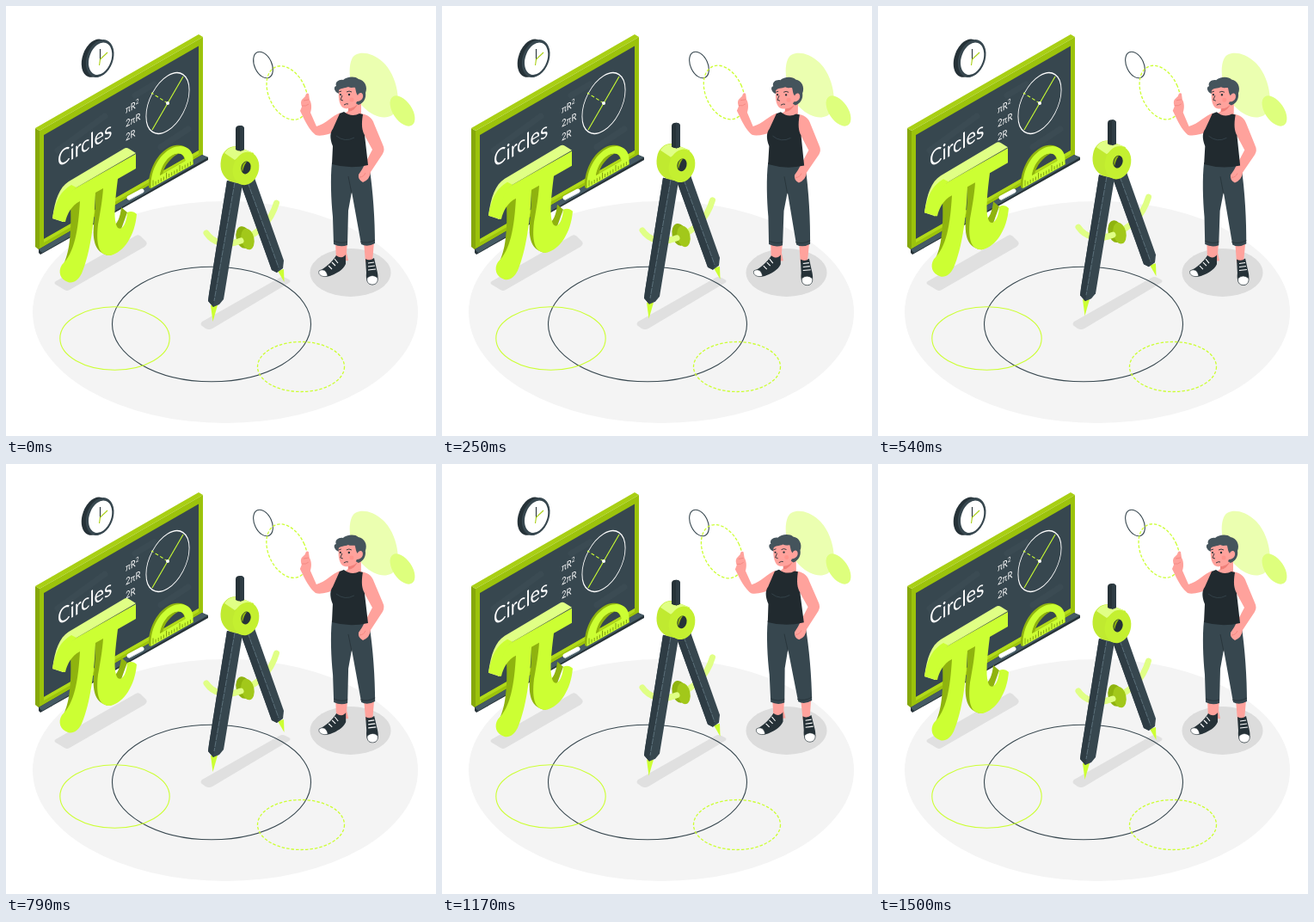
These frames come from a looping animation (500 px wide and 500 px high, 1540 ms). An HTML page:

```html
<!DOCTYPE html>
<html lang="en">
<head>
<meta charset="utf-8">
<title>Circles</title>
<style>
  html, body { margin: 0; height: 100%; overflow: hidden; background: #fff }
  svg { display: block; width: 100vw; height: 100vh }
  text { font-family: Lato, "Open Sans", sans-serif; fill: #fff }
  .line { fill: none; stroke-width: 1.1 }
  .rod { fill: none; stroke: #e0ff85; stroke-width: 7; stroke-linecap: round }
  .main { fill: #cf3 }
  .pale { fill: #e0ff85 }
  .olive { fill: #8fb30f }
  .dark { fill: #37474f }
  .black { fill: #263238 }
  .skin { fill: #ffa29c }
</style>
</head>
<body>
<svg viewBox="0 0 500 500">
  <!-- floor -->
  <ellipse cx="255" cy="356" rx="224" ry="129" fill="#f4f4f4"/>
  <g fill="#e0e0e0">
    <path d="M58 320 151 267Q154 265 157 268L163 274Q165 277 161 280L74 330Q71 332 68 330L58 324Q55 322 58 320Z"/>
    <path d="M228 367 318 316Q321 314 325 316L329 318Q332 320 329 322L240 375Q236 377 232 375L228 372Q225 370 228 367Z"/>
    <ellipse cx="400.500" cy="310" rx="47" ry="28" fill="#dcdcdc"/>
  </g>
  <g class="line">
    <ellipse cx="239" cy="370" rx="115.500" ry="66.700" stroke="#37474f"/>
    <ellipse cx="126.500" cy="386.500" rx="63.700" ry="36.700" stroke="#cf3"/>
    <ellipse cx="343" cy="419.500" rx="50.500" ry="29" stroke="#cf3" stroke-dasharray="3.500 2" stroke-width="1.300"/>
    <ellipse cx="299" cy="68.500" rx="10" ry="16.200" transform="rotate(-25 299 68.500)" stroke="#37474f"/>
  </g>

  <!-- clock -->
  <g transform="rotate(20 106 61)">
    <ellipse cx="103.500" cy="61.500" rx="14.500" ry="23" class="black"/>
    <ellipse cx="109" cy="60" rx="15.300" ry="22.700" class="dark"/>
    <ellipse cx="109.500" cy="60" rx="12.700" ry="19.300" fill="#fff"/>
  </g>
  <path d="M109.500 50V63" class="line" stroke="#263238"/>
  <path d="M108.500 69 109.500 62 118 54" class="line" stroke="#aad014"/>

  <!-- blackboard -->
  <path d="M34 142 39 145V284L34 280Z" fill="#86a80a"/>
  <path d="M34 142 224 33 229 36 39 145Z" fill="#a9cf14"/>
  <path d="M39 145 229 36V174L39 284Z" fill="#9cc30c"/>
  <path d="M44 150 224 46.500V168L44 271Z" class="dark"/>
  <path d="M44 271 224 168V172L44 275Z" fill="#b2da1a"/>
  <path d="M38 283 228 173 235 176V179L40 289 38 287Z" class="black"/>
  <path d="M38 283 228 173 235 176 42 287Z" fill="#455a64"/>
  <path d="M60 168 115 128M150 104 172 91M70 218 108 188M180 164 212 143" stroke="#3b4b53" stroke-width="7" stroke-linecap="round"/>
  <text transform="matrix(.866 -.5 0 1 60 188)" font-size="25">Circles</text>
  <g font-size="11.500">
    <text transform="matrix(.83 -.43 0 1 139 125)">πR<tspan dy="-4" font-size="8">2</tspan></text>
    <text transform="matrix(.83 -.43 0 1 139 141)">2πR</text>
    <text transform="matrix(.83 -.43 0 1 139 157)">2R</text>
  </g>
  <circle r="29.500" transform="matrix(.85 -.52 0 1.080 188 113)" class="line" stroke="#fff"/>
  <path d="M206 82 170 144" class="line" stroke="#cf3"/>
  <path d="M188 113 169 101" class="line" stroke="#cf3" stroke-dasharray="4 2.500"/>
  <circle cx="188" cy="113" r="2" fill="#fff"/>
  <path d="M143 223 158 215" stroke="#fff" stroke-width="5" stroke-linecap="round"/>
  <path d="M143 225.500 159 217" stroke="#cfd8dc"/>

  <!-- protractor -->
  <g fill-rule="evenodd">
    <path class="olive" d="M166 211V206C167 184 182 164 197 162 208 160 215 167 216 177L218 184 168 212ZM182 195 208 180C207 173 203 170 197 172 190 176 184 186 182 195Z"/>
    <path class="main" d="M168.500 212V207C169 186 183 167 198 163.500 210 161 217.500 168 217.500 178V184ZM179 197 208.500 180C208 173 203 170 197 172 188 175 181 185 179 197Z"/>
  </g>
  <path d="M179 197C181 185 188 175 197 172L200 172C192 176 184 186 182 195Z" class="olive"/>
  <path id="ticks" class="line" stroke="#6f8c08" style="stroke-width:.8"/>

  <path d="M402 62C406 52 424 52 438 65 455 80 462 117 449 127 441 132 428 130 415 117 402 104 396 76 402 62Z" fill="#ebffb0"/>
  <ellipse cx="461" cy="122" rx="11" ry="20" transform="rotate(-34 461 122)" fill="#deff7d"/>

  <!-- pi -->
  <g class="float">
    <path class="olive" d="M75 232 104 215 96 270 80 300 67 300C75 284 76 258 75 232ZM104 214 127 202 124 250 121 290C107 289 100 278 102 255 104 237 104 225 104 214ZM141 240 134 234C133 246 129 254 124 257L133 262Z"/>
    <path class="main" d="M151 172V189L130 201C127 225 125 244 128 254 131 264 140 258 141 240 145 238 149 239 152 242 150 267 137 286 122 290 109 291 104 280 107 254 110 237 112 226 113 212L104 217C103 250 98 288 88 311 84 319 78 323 72 321 63 318 60 309 65 301 80 287 84 260 86 227 76 232 71 242 69 251L65 251C66 232 70 218 82 211Z"/>
    <path class="pale" d="M54 247C57 225 62 211 73 204L137 166Q140 164 143 166L151 171 82 211C70 218 66 231 66 251Z"/>
    <path class="main" d="M54 247C58 226 63 216 76 208L82 211C72 218 68 231 68 251Z"/>
  </g>

  <!-- compass -->
  <g class="float">
    <path d="M233 264C241 276 256 279 270 274S306 258 314.500 229" class="rod"/>
    <ellipse cx="276" cy="269" rx="8.500" ry="13" transform="rotate(-12 276 269)" class="olive"/>
    <ellipse cx="281" cy="271" rx="7.500" ry="12.500" transform="rotate(-12 281 271)" fill="#a2c81a"/>
    <path d="M262 276Q268 275 273 273" class="rod"/>
    <path d="M316 308 323 306 323.500 321Z" class="main"/>
    <path d="M273 207 289 200 323 296 322 305 315 310 309 307Z" class="dark"/>
    <path d="M273 207 281 205 317 304 315 310 309 307Z" fill="#2e3c44"/>
    <path d="M281 205 317 304" class="line" stroke="#78909c" stroke-dasharray="7 1" style="stroke-width:.6"/>
    <path d="M238 348 246 348 240.500 367Z" class="main"/>
    <path d="M257 203 275 207 253 341 248 347 241 350 235 343 236 335Z" class="dark"/>
    <path d="M257 203 266 205 242 343 241 350 235 343 236 335Z" fill="#2e3c44"/>
    <path d="M266 205 242 343" class="line" stroke="#78909c" stroke-dasharray="7 1" style="stroke-width:.6"/>
    <path d="M250 179C252 166 264 160 273 165L288 171 277 208 261 204C252 199 248 190 250 179Z" fill="#c0ea30"/>
    <path d="M254 171C258 164 266 162 273 165L288 171 274 173 266 179Z" class="pale"/>
    <path d="M267 143Q267 139 272 139T277 143V167Q272 170 267 167Z" class="black"/>
    <path d="M272 139Q277 139 277 143V167L272 169Z" fill="#2e3c44"/>
    <ellipse cx="279" cy="189" rx="15" ry="19.500" transform="rotate(15 279 189)" fill="#c4f030"/>
    <ellipse cx="279" cy="188" rx="5.500" ry="7.500" transform="rotate(15 279 188)" class="black"/>
    <path d="M275 193C273 187 276 181 280 181 277 185 276 189 275 193Z" class="olive"/>
  </g>

  <!-- teacher -->
  <g id="teacher">
    <ellipse cx="327" cy="101" rx="21.500" ry="33" transform="rotate(-25 327 101)" class="line" stroke="#cf3" stroke-dasharray="3.500 2" style="stroke-width:1.3"/>
    <path class="skin" d="M389 124C380 127 372 137 361 140L354 124C356 118 355 112 353 109L352 102Q349 100 348 105L344 109Q342 112 344 117L342 122 345 128C350 139 355 146 360 150 366 152 376 149 383 146Z"/>
    <path d="M344 116Q349 117 352 114M346 110 352 109" class="line" stroke="#f07f79" style="stroke-width:.7"/>
    <path class="skin" d="M383 272H397L396 287 398 296 384 297ZM416 274H428L426 298H418Z"/>

    <!-- shoes -->
    <path class="black" d="M384 290C389 294 393 292 395 289L395 300C392 307 384 311 379 313 371 317 363 313 364 308 371 305 379 298 384 290Z"/>
    <path d="M364 308C369 305 373 308 374 314 369 316 362 313 364 308Z" fill="#fff" stroke="#263238" stroke-width=".6"/>
    <path d="M375 302 379 306M379 298 383 302M382 294 386 299" class="line" stroke="#fff"/>
    <path class="black" d="M418 294Q423 297 428 293L431 306C433 313 434 322 428 324 421 325 418 320 419 310Z"/>
    <path d="M420 316Q426 311 432 316C433 321 430 324 426 324 421 324 419 320 420 316Z" fill="#fff" stroke="#263238" stroke-width=".6"/>
    <path d="M421 299 428 298M421 303 429 302M421 307 430 306" class="line" stroke="#fff"/>

    <!-- clothes -->
    <path class="dark" d="M379 182C377 200 378 225 380 245L381 277Q389 281 397 278L398 238 402 216 413 277Q420 281 429 276C429 250 427 215 422 184Z"/>
    <path d="M402 218 398 198M381 273Q390 277 397 274M412 274Q420 277 429 272" class="line" stroke="#263238" style="stroke-width:.8"/>
    <path class="skin" d="M410 125C420 125 426 130 428 137L438 161Q441 167 438 172L424 193Q423 202 415 205 409 202 410 196L414 190 426 167 414 145Z"/>
    <path d="M411 199Q416 199 418 194" class="line" stroke="#f07f79" style="stroke-width:.7"/>
    <path class="skin" d="M398 112 413 105 413 128Q406 135 391 127L398 122Z"/>
    <path d="M398 119Q406 119 410 112 406 122 398 123Z" fill="#f07f79"/>
    <path fill="#212a2f" d="M388 125 393 123Q402 130 411 125L415 126C413 138 414 145 417 150L421 185Q400 190 379 184L380 163C376 153 377 147 380 143Z"/>
    <path d="M384 151Q394 159 405 153" class="line" stroke="#37474f" style="stroke-width:.8"/>

    <!-- head -->
    <path fill="#45545c" d="M387 102C382 100 380 94 384 93 382 88 388 85 392 86 396 82 406 81 410 85 417 86 421 94 418 101 419 107 416 113 410 115L398 108Z"/>
    <path class="skin" d="M387 98C389 95 394 96 398 94 402 96 405 94 406 95 407 99 407 102 409 104 411 99 416 101 415 106 414 110 410 111 408 111 406 117 400 120 394 119 388 118 386 108 387 98Z"/>
    <path d="M387 100 390 99M396 100Q399 98 402 100M391 104 389 109 392 110M393 115Q396 113 398 114" class="line" stroke="#263238" style="stroke-width:.9"/>
    <g class="black"><circle cx="389" cy="103" r="1.100"/><circle cx="399" cy="103" r="1.200"/></g>
    <circle cx="402" cy="109" r="2.500" fill="#ff8880" opacity=".5"/>
  </g>
</svg>
<script>
  const LOOP = 1540, PERIOD = 1500;
  const floaters = document.querySelectorAll('.float');
  const teacher = document.getElementById('teacher');

  let ticks = '';
  for (let i = 0; i < 15; i++) {
    const x = 171 + i * 3.1, y = 209.5 - i * 1.75;
    ticks += `M${x} ${y}v${i % 5 ? -4 : -7}`;
  }
  document.getElementById('ticks').setAttribute('d', ticks);

  // Triangle wave from 0 up to 1 and back
  const triangle = p => 1 - Math.abs(2 * (p % 1) - 1);

  function draw(now) {
    const phase = Math.min(now % LOOP, PERIOD) / PERIOD;
    const lift = -9.5 * triangle(phase);
    const angle = 2 * triangle(phase + 0.25) - 1;
    floaters.forEach(g => g.setAttribute('transform', `translate(0 ${lift})`));
    teacher.setAttribute('transform', `rotate(${angle} 371 197)`);
    requestAnimationFrame(draw);
  }
  draw(0);
</script>
</body>
</html>
```
